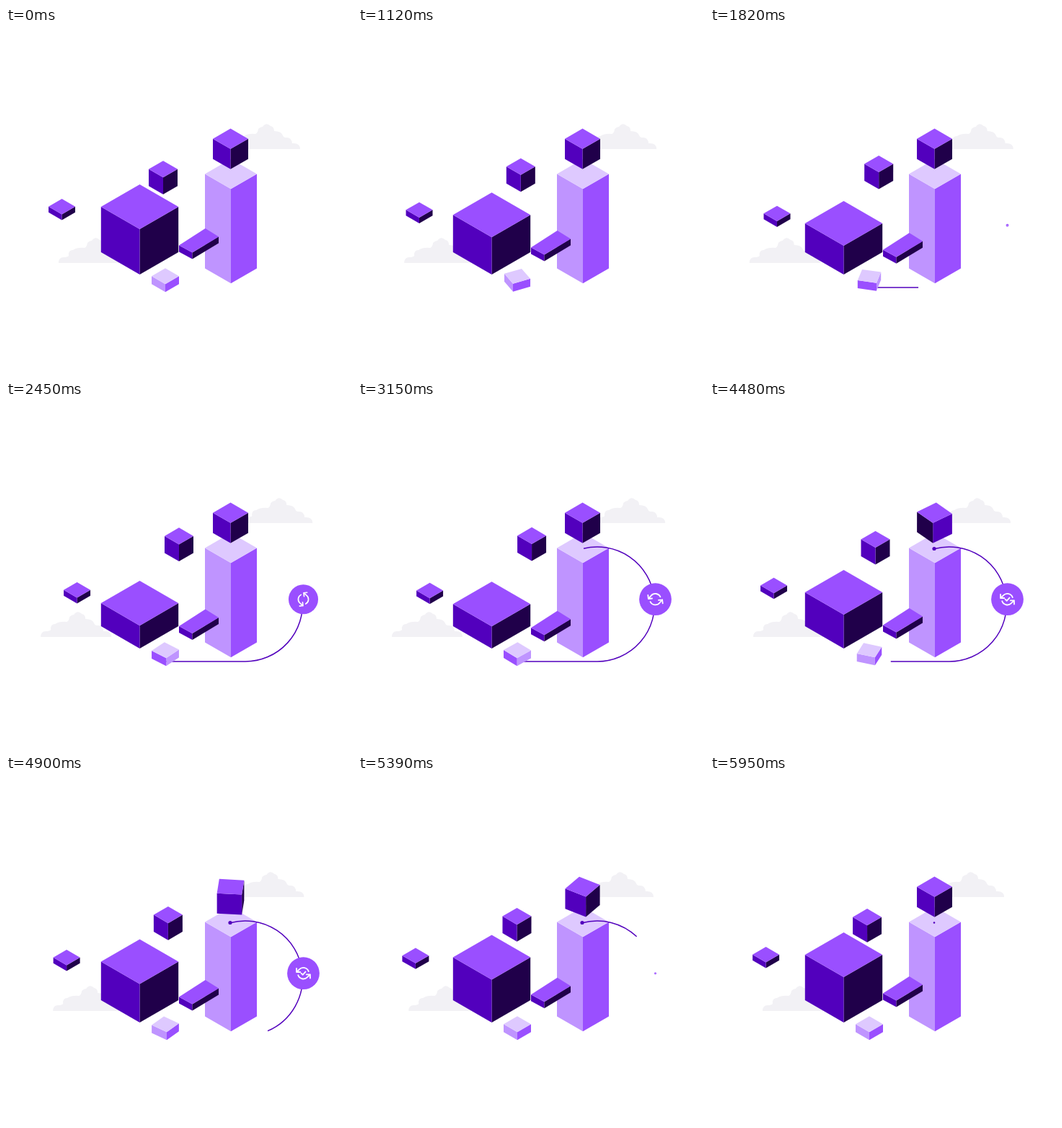
Animation of 480x480 px, one loop 6.02 s. Source, as an HTML page with a canvas:

```html
<!DOCTYPE html>
<html lang="en">
<head>
<meta charset="utf-8">
<title>Floating blocks</title>
<style>
html, body { margin: 0; width: 100%; height: 100%; overflow: hidden; background: #fff; }
canvas { display: block; width: 480px; height: 480px; }
</style>
</head>
<body>
<canvas id="stage" width="480" height="480"></canvas>
<script>
const LOOP = 6020;
const ctx = document.getElementById('stage').getContext('2d');

// Each palette: top, right face, left face
const DARK = ['#9a4fff', '#20004a', '#5200bd'];
const LIGHT = ['#dec9ff', '#9a4fff', '#bf94ff'];
const LINE = '#5200bd';

const cloud = new Path2D('M0 0Q0-8 7-8Q12-8 14-10Q13-18 20-18Q26-22 36-21' +
  'Q39-22 40-28Q43-31 46-31Q51-38 57-32Q62-31 62-25Q72-25 74-19Q75-16 78-16' +
  'Q86-17 87-8Q98-9 98 0Z');
const route = new Path2D('M222 360H332A79.5 79.5 0 1 0 311 203.8');
const ROUTE_LENGTH = 381;
const arrows = new Path2D('M1 4V10H7M23 20V14H17' +
  'M20.49 9A9 9 0 0 0 5.64 5.64L1 10M23 14L18.36 18.36A9 9 0 0 1 3.51 15');
const check = new Path2D('M8.5 12L11 14.5L15.5 9.5');

const rad = deg => deg * Math.PI / 180;
const mix = (a, b, s) => a + (b - a) * s;

// Cubic easing with horizontal handles at a and b
function ease(t, from, to, a = 1 / 3, b = 2 / 3) {
  const u = Math.min(1, Math.max(0, (t - from) / (to - from)));
  let lo = 0, hi = 1;
  for (let i = 0; i < 24; i++) {
    const s = (lo + hi) / 2, r = 1 - s;
    if (3 * s * r * r * a + 3 * s * s * r * b + s * s * s < u) lo = s;
    else hi = s;
  }
  return lo * lo * (3 - 2 * lo);
}

// Rises to 1 at peak, back to 0 at the end of the loop
const sway = (t, peak) => t < peak ? ease(t, 0, peak) : 1 - ease(t, peak, LOOP);

function poly(color, points) {
  ctx.beginPath();
  points.forEach(p => ctx.lineTo(p[0], p[1]));
  ctx.closePath();
  ctx.fillStyle = color;
  ctx.fill();
}

function side(color, p, q, h) {
  poly(color, [p, q, [q[0], q[1] + h], [p[0], p[1] + h]]);
}

// Isometric box around the centre of its top face, turned about the vertical axis
function box(x, y, r, h, colors, turn = 0) {
  const quarter = Math.floor(turn / 90 + 1e-4);
  const rest = turn - quarter * 90;
  const corner = i => {
    const a = rad(rest + 90 * i);
    return [x + r * Math.cos(a), y + r * 0.578 * Math.sin(a)];
  };
  for (const i of [-1, 0, 1]) {
    if (Math.sin(rad(rest + 45 + 90 * i)) <= 0) continue;
    side(colors[1 + ((i - quarter) & 1)], corner(i), corner(i + 1), h);
  }
  poly(colors[0], [0, 1, 2, 3].map(corner));
}

function drawArm(dy) {
  const left = [240, 301.5 + dy], back = [276.5, 278 + dy];
  const right = [295, 289.5 + dy], front = [258.5, 311.5 + dy];
  side(DARK[2], left, front, 9);
  side(DARK[1], front, right, 9);
  poly(DARK[0], [left, back, right, front]);
}

function drawCloud(x, y) {
  ctx.save();
  ctx.translate(x, y);
  ctx.fillStyle = '#f2f1f5';
  ctx.fill(cloud);
  ctx.restore();
}

function disc(x, y, r, color) {
  if (r <= 0.05) return;
  ctx.beginPath();
  ctx.arc(x, y, r, 0, 7);
  ctx.fillStyle = color;
  ctx.fill();
}

function drawRoute(t) {
  const start = ROUTE_LENGTH * ease(t, 4193, 5903);
  const end = ROUTE_LENGTH * ease(t, 1300, 3250);
  if (end - start < 0.1) return;
  ctx.save();
  ctx.setLineDash([end - start, 1000]);
  ctx.lineDashOffset = -start;
  ctx.strokeStyle = LINE;
  ctx.lineWidth = 1.5;
  ctx.stroke(route);
  ctx.restore();
}

function drawBadge(t) {
  const scale = ease(t, 1645, 2625) - ease(t, 4923, 5479);
  if (scale < 0.01) return;
  disc(412.5, 273.7, 22.4 * scale, DARK[0]);
  ctx.save();
  ctx.translate(412.5, 273.7);
  ctx.scale(scale * 0.86, scale * 0.86);
  ctx.strokeStyle = '#fff';
  ctx.lineWidth = 2.1;
  ctx.lineCap = ctx.lineJoin = 'round';
  ctx.save();
  ctx.rotate(rad(180 * (ease(t, 1645, 3350) + ease(t, 3800, 4470))));
  ctx.translate(-12, -12);
  ctx.stroke(arrows);
  ctx.restore();
  const drawn = ease(t, 3200, 3700);
  if (drawn > 0.01) {
    ctx.translate(-12, -12);
    ctx.setLineDash([10.4 * drawn, 100]);
    ctx.stroke(check);
  }
  ctx.restore();
}

function draw(t) {
  const s = sway(t, 2900);
  ctx.clearRect(0, 0, 480, 480);

  drawCloud(mix(73, 46.5, s), 326);
  drawCloud(mix(310, 328.5, s), 168);

  box(312, 202.5, 36, 131, LIGHT);
  box(311.5, 153.7, 24.5, 28, DARK, 180 * ease(t, 3420, LOOP, 0.333, 0.38));

  const drop = 33 * sway(t, 2870);
  box(185.5, 248 + drop, 53.7, 63 - drop, DARK);
  box(mix(218, 241.5, s), mix(195.7, 185.2, s), 20, 23.5, DARK);
  box(mix(77.5, 100, s), mix(247.7, 261.7, s), 18.5, 8, DARK);
  drawArm(12 * sway(t, 3500));

  drawRoute(t);
  disc(311, 203.5, 2.6 * (ease(t, 3150, 3500) - ease(t, 5740, 6160)), LINE);
  drawBadge(t);

  box(221, 344.3, 19, 11, LIGHT, 90 * (ease(t, 465, 2723) + ease(t, 3000, 5258)));
}

const begin = performance.now();
function tick() {
  draw((performance.now() - begin) % LOOP);
  requestAnimationFrame(tick);
}
tick();
</script>
</body>
</html>
```
